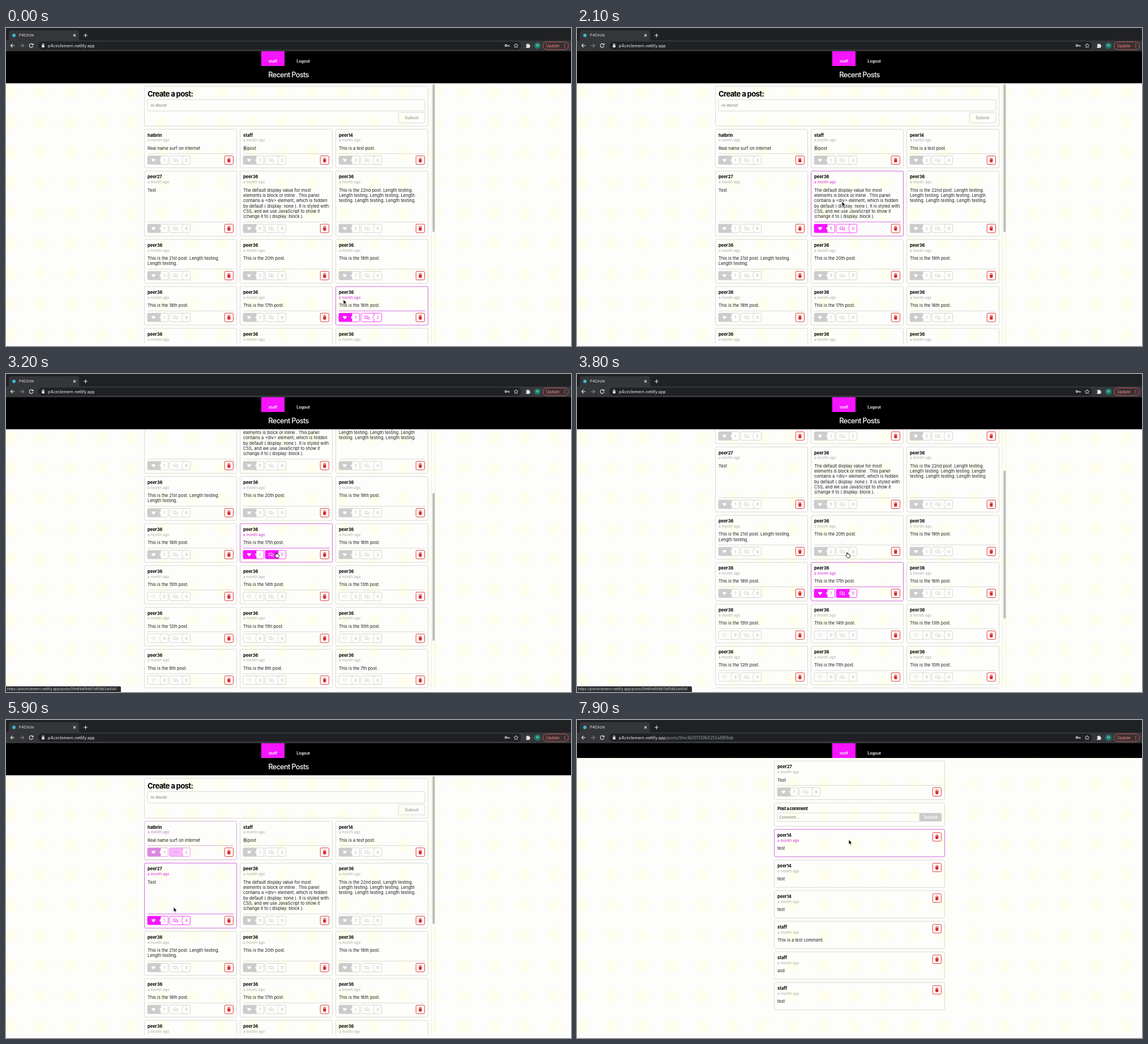
Write an HTML page that moves like this. It is 998x561 px and loops after 8000 ms.

```html
<!DOCTYPE html>
<html lang="en">
<head>
<meta charset="utf-8">
<title>P4Circle</title>
<style>
html, body { margin: 0; width: 100%; height: 100%; overflow: hidden; background: #fdfdfb; }
svg { display: block; }
text { font: 7.47px Inter, "Noto Sans CJK SC", "Noto Sans CJK JP", sans-serif; fill: #1b1b1b; white-space: pre; }
.b { font-weight: 700; fill: #000; }
.s { font-size: 6.55px; }
.m { text-anchor: middle; }
.h { letter-spacing: -.05em; }
.w { fill: #fff; font-weight: 600; font-size: 7px; }
.big { font-size: 13.1px; }
.hint { fill: #777; }
.off { fill: #aaa; font-size: 7px; }
.box { fill: none; stroke: #d0d0cc; stroke-width: .8; }
.red { fill: #db2828; stroke: #db2828; }
.card { --edge: #d0d0cc; --tone: #ccc; --ink: #aaa; --fill: #fdfdfb; --icon: #ccc; }
.card .box { stroke: var(--edge); }
.card .ink { fill: var(--ink); }
.btn { fill: #fdfdfb; stroke: var(--tone); stroke-width: .8; }
.on { fill: var(--tone); }
.talk { fill: var(--fill); }
.line { fill: none; stroke: var(--icon); stroke-width: .8; stroke-linejoin: round; }
.ui { fill: none; stroke: #e8eaed; stroke-width: 1.1; }
</style>
</head>
<body>
<svg id="stage" width="998" height="561" viewBox="0 0 998 561">
  <defs>
    <radialGradient id="glow">
      <stop offset=".45" stop-color="#ffffee"/>
      <stop offset="1" stop-color="#ffffee" stop-opacity="0"/>
    </radialGradient>
    <pattern id="dots" x="-18.7" y="86.3" width="53.4" height="53.4" patternUnits="userSpaceOnUse">
      <circle cx="26.7" cy="26.7" r="16" fill="url(#glow)"/>
    </pattern>
    <clipPath id="view"><rect y="97.5" width="998" height="458.5"/></clipPath>
  </defs>
  <rect width="998" height="561" fill="#fdfdfb"/>
  <rect width="998" height="561" fill="url(#dots)"/>

  <g id="feed">
    <g clip-path="url(#view)"><g id="list"></g></g>
    <path d="M751.5 98V556M758 98V556" stroke="#e6e6e6" stroke-width=".7"/>
    <rect id="thumb" x="753.3" y="99" width="4" height="261" rx="2" fill="#bcbcbc"/>
    <rect y="41" width="998" height="56.5"/>
    <text class="h m" x="499" y="87.3" style="font-size:12.7px;font-weight:500;fill:#fff">Recent Posts</text>
  </g>
  <g id="thread"><rect y="41" width="998" height="26"/></g>

  <rect x="450.8" y="41" width="41.2" height="26" fill="#f714ff"/>
  <text class="w m" id="me" x="471.5" y="61.3"></text>
  <text class="w m" x="525" y="61.3">Logout</text>

  <rect width="998" height="41" fill="#35363a"/>
  <path d="M0 0H998V22H133Q129 22 129 18V8Q129 4 125 4H9Q5 4 5 8V18Q5 22 1 22H0Z" fill="#202124"/>
  <circle cx="14" cy="13" r="3" fill="#3fb5d0"/>
  <text class="s" x="23" y="15.3" style="fill:#e8eaed">P4Circle</text>
  <path class="ui" d="M118.9 10.9l4.2 4.2m0-4.2l-4.2 4.2M137.2 13h6.6m-3.3-3.3v6.6"/>
  <rect x="57" y="24" width="853" height="14" rx="7" fill="#202124"/>
  <path class="ui" d="M15 31H8.3m3.2-3.2L8.3 31l3.2 3.2M47.4 29.3a3.3 3.3 0 1 0 .3 2.6M48 27.4v2.4h-2.4"/>
  <path class="ui" d="M24.6 31h6.7m-3.2-3.2l3.2 3.2l-3.2 3.2" style="stroke:#85878b"/>
  <path d="M63.3 30.2h4.6v4h-4.6z" fill="#e8eaed"/>
  <path class="ui" d="M64.2 30.3v-1a1.4 1.4 0 0 1 2.8 0v1"/>
  <text x="74" y="33.6" style="font-size:7.2px;fill:#f1f3f4">p4circlemern.netlify.app<tspan id="path" fill="#9aa0a6">/posts/5fec6b101129b5252a88f9ab</tspan></text>
  <circle class="ui" cx="883" cy="31" r="1.6"/>
  <path class="ui" d="M884.6 31h4.4v1.8m-1.8-1.8v1.4"/>
  <path class="ui" d="M901 27.4l1.1 2.4 2.6.3-1.9 1.8.5 2.6-2.3-1.3-2.3 1.3.5-2.6-1.9-1.8 2.6-.3z" style="stroke-width:.8"/>
  <path d="M918.6 28.7h2a1.2 1.2 0 0 1 2.4 0h2v2a1.2 1.2 0 0 1 0 2.4v1.9h-6.4v-2a1.2 1.2 0 0 0 0-2.4z" fill="#e8eaed"/>
  <circle cx="938.7" cy="31" r="5.6" fill="#177a68"/>
  <text class="s m" x="938.7" y="33.3" style="fill:#e8eaed">H</text>
  <rect x="948.5" y="24.5" width="45" height="13.5" rx="6.75" fill="#3c2f31" stroke="#c9665f" stroke-width=".9"/>
  <text class="s" x="954" y="33.5" style="fill:#f28b82;font-size:6.9px">Update</text>
  <path d="M986.3 28h1.2v1.3h-1.2zm0 2.5h1.2v1.3h-1.2zm0 2.5h1.2v1.3h-1.2z" fill="#f28b82"/>

  <g id="status">
    <path d="M0 551H201Q203 551 203 553V561H0Z" fill="#2b2c30"/>
    <text id="link" x="2" y="558.2" style="font-size:6.2px;fill:#d5d7da"></text>
  </g>
  <g id="arrow"><path d="M0 0V8.2L1.9 6.5L3.2 9.4L4.7 8.7L3.4 5.9H6Z" stroke="#fff" stroke-width=".7"/></g>
  <g id="hand"><path d="M2.2.7Q3.4-.2 3.8 1.2V3.6Q5-.1 6 4Q7.1 3.2 7.4 4.5Q8.6 4.2 8.6 5.6Q8.6 8 7.5 9.6H3.4Q2.6 8 .6 6Q.2 4.6 2.2 5.4Z" fill="#fff" stroke="#000" stroke-width=".8"/></g>
</svg>
<script>
{
const $ = id => document.getElementById(id);
const LOOP = 8000, SWITCH = 6700, FADE = 200, STEPS = 20;
const OWNER = 'staff', REAL = 'halbrin', P2 = 'peer14', P3 = 'peer27', P5 = 'peer36';
const esc = s => s.replace(/</g, '&lt;');
const text = (x, y, s, cls = '') => `<text class="${cls}" x="${x}" y="${y}">${esc(s)}</text>`;
const box = (x, y, w, h) => `<rect class="box" x="${x}" y="${y}" width="${w}" height="${h}" rx="1.9"/>`;

const heart = 'M0 2.9C-5-.6-3-3.4-1.3-2.6Q-.4-2.3 0-1.6Q.4-2.3 1.3-2.6C3-3.4 5-.6 0 2.9Z';
const bubbles = 'M-4-2.6H1.2V.9H-2L-3.6 2.2V.9H-4ZM2.2-1H4V2.3H3.4V3.5L2 2.3H-.8V1.8';

// Icon half on the left, pointed count label on the right
function button(x, y, count, cls, icon) {
  return `<g transform="translate(${x} ${y})">
    <path class="btn ${cls}" d="M24 0H1.9Q0 0 0 1.9V13.1Q0 15 1.9 15H24"/>
    <path class="btn" d="M23 0H34.6Q36.5 0 36.5 1.9V13.1Q36.5 15 34.6 15H23V10.4L20.6 7.5L23 4.6Z"/>
    <g transform="translate(10.5 7.6)">${icon}</g>${text(29.7, 10, count, 's m ink')}</g>`;
}
const trash = (x, y) => `<g transform="translate(${x} ${y})">
  <rect class="red" width="15.2" height="15" rx="1.9" style="fill:#fdfdfb;stroke-width:.9"/>
  <path class="red" d="M4.7 4.3H10.5M6.7 3.7H8.5M5.3 6H9.9L9.6 11H5.6Z" stroke-width=".8"/></g>`;

const items = [];
function card(parent, { x, y, w, h, name, lines, likes, talks }) {
  const g = document.createElementNS('http://www.w3.org/2000/svg', 'g');
  const left = x + 5.5, by = y + h - 21, isPost = likes !== undefined;
  let out = box(x, y, w, h) + text(left, y + 13, name, 'b') + text(left, y + 21.6, 'a month ago', 's ink');
  lines.forEach((s, i) => out += text(left, y + 36.1 + i * 9.33, s));
  if (isPost) {
    const loved = likes ? `<path d="${heart}" fill="#fff"/>` : `<path class="line" style="stroke:var(--tone)" d="${heart}"/>`;
    out += `<path class="box" d="M${left} ${y + h - 25}H${x + w - 5}"/>`
      + button(left, by, '' + likes, likes ? 'on' : '', loved)
      + button(left + 39, by, '' + talks, 'talk', `<path class="line" d="${bubbles}"/>`);
  }
  g.innerHTML = out + trash(x + w - 21.3, isPost ? by : y + 5.7);
  g.setAttribute('class', 'card');
  parent.append(g);
  items.push({ g, x, y, w, h, feed: parent === $('list'), bx: isPost ? left + 39 : -99, by });
}

const nth = n => `This is the ${n}${['', 'st', 'nd'][n - 20] || 'th'} post.`;
const posts = [
  [REAL, 'Real name surf on internet', 1, 2], [OWNER, '新post', 1, 2], [P2, 'This is a test post.', 2, 0],
  [P3, 'Test', 1, 6],
  [P5, 'The default display value for most|elements is block or inline . This panel|contains a <div> element, which is hidden|by default ( display: none ). It is styled with|CSS, and we use JavaScript to show it|(change it to ( display: block ).', 5, 0],
  [P5, nth(22) + ' Length testing.|Length testing. Length testing. Length|testing. Length testing. Length testing.', 2, 0],
  [P5, nth(21) + ' Length testing.|Length testing.', 1, 0], [P5, nth(20), 2, 0]
];
for (let n = 19; n > 4; n--) posts.push([P5, nth(n), n > 15 ? 1 : 0, n === 16 ? 2 : 0]);

$('list').innerHTML = box(244.5, 103, 501, 70) + text(250, 121.3, 'Create a post:', 'b h big')
  + box(250, 126.3, 490, 20) + text(255.7, 138.8, 'Hi World!', 's hint')
  + box(693.3, 149.3, 46.7, 18) + text(716.6, 160.8, 'Submit', 'b m off');

let rowY = 178.6;
for (let i = 0; i < posts.length; i += 3) {
  const row = posts.slice(i, i + 3);
  const h = 58.7 + 9.33 * Math.max(...row.map(p => p[1].split('|').length));
  row.forEach(([name, body, likes, talks], c) =>
    card($('list'), { x: 244.5 + c * 169, y: rowY, w: 163, h, name, lines: body.split('|'), likes, talks }));
  rowY += h + 5.8;
}

const wide = { x: 348.5, w: 301 };
card($('thread'), { ...wide, y: 72.4, h: 68, name: P3, lines: ['Test'], likes: 1, talks: 6 });
$('thread').insertAdjacentHTML('beforeend', box(348.5, 146.4, 301, 40.8)
  + text(354, 159.3, 'Post a comment', 'b h') + box(354, 164, 251, 15)
  + '<rect x="605" y="164" width="39" height="15" rx="1.5" fill="#ccc"/>'
  + text(357, 174, 'Comment...', 's hint') + text(624.6, 174, 'Submit', 'w m'));
[[P2, 'test'], [P2, 'test'], [P2, 'test'], [OWNER, 'This is a test comment.'], [OWNER, 'asd'], [OWNER, 'test']]
  .forEach(([name, body], i) => card($('thread'), { ...wide, y: 193 + i * 54, h: 48.3, name, lines: [body] }));
$('me').textContent = OWNER;

// Keys: time, then values
const pointer = [[-300, 597, 545], [0, 597, 483], [300, 590, 470], [900, 460, 225], [1200, 688, 205], [1500, 688, 205],
  [2100, 469, 310], [2700, 469, 310], [2850, 478, 319], [3800, 478, 319], [4400, 494, 349], [4900, 494, 349],
  [5740, 306, 234], [5900, 297, 334], [6150, 306, 354], [6800, 306, 354], [7500, 481, 215]];
const scrolling = [[2450, 0], [2700, 126.3], [2900, 192], [3700, 192], [3800, 124.2], [4050, 0]];
function at(keys, t) {
  const n = keys.findIndex(k => k[0] > t);
  if (n < 1) return (n ? keys[keys.length - 1] : keys[0]).slice(1);
  const a = keys[n - 1], b = keys[n], p = (t - a[0]) / (b[0] - a[0]);
  return a.slice(1).map((v, i) => v + (b[i + 1] - v) * p);
}
const between = (t, a, b) => t >= a && t < b;
const mix = (a, b, p) => `rgb(${a.map((v, i) => Math.round(v + (b[i] - v) * p))})`;
const PINK = [247, 20, 255], GREY = [204, 204, 204], PAPER = [253, 253, 251];
const inside = (x, y, l, t, w, h) => x > l && x < l + w && y > t && y < t + h;

// A card's tint is the share of the last moments it spent under the pointer
function hover(t) {
  for (const it of items) it.hot = it.press = 0;
  for (let i = 0; i < STEPS; i++) {
    const s = t - FADE * i / STEPS, feed = s < SWITCH;
    const [x, py] = at(pointer, s);
    const y = py + (feed ? at(scrolling, s - 100)[0] : 0);
    for (const it of items) if (it.feed === feed && inside(x, y, it.x, it.y, it.w, it.h)) {
      it.hot++;
      if (inside(x, y, it.bx, it.by, 36, 15)) it.press++;
    }
  }
  for (const it of items) {
    const p = Math.min(1, 1.5 * it.hot / STEPS), q = Math.min(1, 1.5 * it.press / STEPS);
    const set = (k, v) => it.g.style.setProperty('--' + k, v);
    const tone = GREY.map((v, i) => v + (PINK[i] - v) * p);
    set('edge', mix([208, 208, 204], [198, 70, 214], p));
    set('tone', mix(GREY, PINK, p));
    set('ink', mix([170, 170, 170], [214, 40, 220], p));
    set('fill', mix(PAPER, PINK, q));
    set('icon', mix(tone, PAPER, q));
  }
}

const show = (id, on) => $(id).style.display = on ? '' : 'none';
function draw(t) {
  const feed = t < SWITCH, [x, y] = at(pointer, t), [offset] = at(scrolling, t);
  const hand = between(t, 2650, 3950) || between(t, 6120, SWITCH);
  show('feed', feed);
  show('thread', !feed);
  show('path', !feed);
  show('status', between(t, 2850, 3950) || between(t, 6200, SWITCH));
  show('hand', hand);
  show('arrow', !hand);
  $('link').textContent = 'https://p4circlemern.netlify.app/posts/' + (t < 5000 ? '5fe9f4df99611df5863d454f' : '5fec6b101129b5252a88f9ab');
  $('list').setAttribute('transform', `translate(0 ${-offset})`);
  $('thumb').setAttribute('y', 99 + offset * .577);
  $('arrow').setAttribute('transform', `translate(${x - 1} ${y - 3.8})`);
  $('hand').setAttribute('transform', `translate(${x - 4} ${y - 4.5})`);
  hover(t);
}

const start = performance.now();
(function tick() {
  draw((performance.now() - start) % LOOP);
  requestAnimationFrame(tick);
})();
}
</script>
</body>
</html>
```
